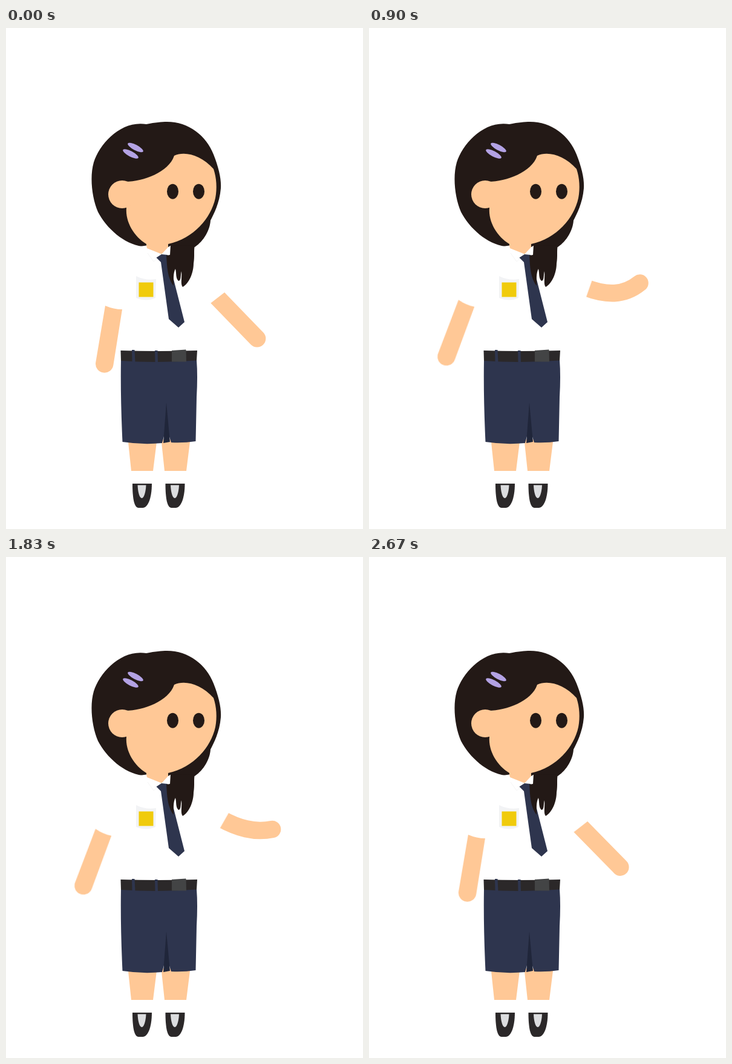
An HTML page without scripts for the animation above (2.7 s loop, 590 by 828 pixels).

```html
<!DOCTYPE html>
<html lang="en">
<head>
<meta charset="utf-8">
<title>Waving schoolgirl</title>
<style>
  html, body { margin: 0; width: 100%; height: 100%; overflow: hidden; background: #fff; }
  svg { display: block; width: 100vw; height: 100vh; }
  .skin { fill: #ffc896; }
  .hair { fill: #231916; }
  .navy { fill: #2e354e; }
  .black { fill: #2b2829; }
  .white { fill: #fff; }

  .swing, .sleeve, .wave, .eye, .lash { animation: 2700ms infinite ease-in-out; }
  .swing { transform-origin: 205px 373px; animation-name: swing; }
  .sleeve { transform-origin: 332px 415px; animation-name: sleeve; }
  .wave {
    fill: none; stroke: #ffc896; stroke-width: 28.6; stroke-linecap: round;
    animation-name: wave;
  }
  .eye { transform-box: fill-box; transform-origin: center; animation-name: blink; }
  .lash {
    fill: none; stroke: #231916; stroke-width: 1.5;
    animation-name: lash; animation-timing-function: step-end;
  }

  @keyframes swing {
    0%, 11.111%, 100% { transform: rotate(0deg); }
    33.333%, 77.778% { transform: rotate(11.3deg); }
  }

  /* The forearm starts late, then bends up twice. */
  @keyframes wave {
    0%, 11.111%, 100% { d: path("M346 442 C371 468 393 490.5 415 513.3"); }
    11.111% { animation-timing-function: ease-in; }
    21.111% {
      d: path("M351 437 C380 461 404 481 428.5 500.5");
      animation-timing-function: cubic-bezier(.35, .2, .58, 1);
    }
    33.333%, 77.778% { d: path("M358 429 C392 442 421 443 447.5 421.5"); }
    55.556% {
      d: path("M351 437 C379 459 402 478 426.5 487");
      animation-timing-function: ease-in;
    }
    67.778% {
      d: path("M355 432.5 C383 448 410 456 440 450.2");
      animation-timing-function: ease-out;
    }
    77.778% { animation-timing-function: ease-in; }
    87.778% {
      d: path("M352.5 435 C380 451 408 463 437.5 462.5");
      animation-timing-function: ease-out;
    }
  }
  @keyframes sleeve {
    0%, 11.111%, 100% { transform: rotate(0deg); }
    11.111% { animation-timing-function: ease-in; }
    21.111% {
      transform: rotate(-10.5deg);
      animation-timing-function: cubic-bezier(.35, .2, .58, 1);
    }
    33.333%, 77.778% { transform: rotate(-33deg); }
    55.556% { transform: rotate(-11deg); animation-timing-function: ease-in; }
    67.778% { transform: rotate(-22.5deg); animation-timing-function: ease-out; }
    77.778% { animation-timing-function: ease-in; }
    87.778% { transform: rotate(-17.5deg); animation-timing-function: ease-out; }
  }

  @keyframes blink {
    0%, 22.222%, 30%, 81.111%, 88.889%, 100% { transform: scale(1, 1); }
    22.222%, 28.889%, 81.111%, 87.778% { animation-timing-function: step-end; }
    23.333%, 28.889%, 82.222%, 87.778% { transform: scale(.8, .76); }
    26.111%, 85% { transform: scale(.8, .1); }
  }
  @keyframes lash {
    0%, 30%, 88.889%, 100% { opacity: 0; }
    23.333%, 82.222% { opacity: 1; }
  }
</style>
</head>
<body>
<svg viewBox="0 0 590 828" preserveAspectRatio="none">
  <defs>
    <g id="shoe">
      <path class="black" d="M209 753H241C241 778 234 793 226 793H219C212 793 209 778 209 753Z"/>
      <path fill="#dcdddf" d="M217.500 755.500H231.500C231 767 228 777 224.500 777C220.500 777 218 767 217.500 755.500Z"/>
    </g>
    <path id="leg" class="skin" d="M201.500 680H249.500L243 732H207Z"/>
    <ellipse id="clip" rx="14.300" ry="4.600" fill="#b3a2e4"/>
  </defs>

  <!-- arms -->
  <path class="skin swing" d="M164 459Q178 465 192 465L177.400 557A14.600 14.600 0 0 1 148.200 553Z"/>
  <path class="wave" d="M346 442 C371 468 393 490.500 415 513.300"/>
  <path class="white sleeve" d="M365 434L334 458L316 434L347 410Z"/>

  <!-- legs, shorts and belt -->
  <use href="#leg"/>
  <use href="#leg" x="55"/>
  <use href="#shoe"/>
  <use href="#shoe" x="54.500"/>
  <path class="navy" d="M190 549H315Q317 575 315 610L313.500 683Q294 686 273 685L265 660L258 686Q225 689 192.500 684Q189 610 190 549Z"/>
  <path fill="#20263a" d="M265 619L271 684L260 686Z"/>
  <path class="black" d="M189.500 533Q250 535 316 533L315 549.500Q250 554 190 550Z"/>
  <path class="navy" d="M208 532H212.500L213.500 552H208.500ZM246 533H250.500L251 552.500H246.500Z"/>
  <path fill="#434445" d="M274 533L297.500 531.500L298 551.500H274Z"/>

  <!-- head -->
  <path class="hair" d="M232 159C247 156 257 155 266 155C302 155 331 178 343 209C352 232 356 250 355 265
    C353 290 343 308 338 318C337 334 327 352 312 362L266 362L225 361C195 357 166 331 152 304
    C142 281 138 246 145 222C155 190 191 152 232 159Z"/>
  <path class="skin" d="M187 253C214 258 268 242 278 211C296 203 322 210 343 233C348 248 349 265 346 281
    C339 314 310 348 268 357V366L257 376L232 366V357C212 345 197 321 199 297Z"/>
  <circle class="skin" cx="192" cy="275" r="23"/>
  <path class="white" d="M268 362L272.500 359.500L272 375L257 374ZM221 361L232 359.500L233 364L258 374L249 381L243 386Z"/>
  <path fill="none" stroke="#f5f5f5" d="M234 372L244 386L250 381"/>
  <ellipse class="hair eye" cx="275.500" cy="270.200" rx="9.500" ry="12.500"/>
  <ellipse class="hair eye" cx="318.500" cy="270.200" rx="9.500" ry="12.500"/>
  <path class="lash" d="M271 260Q275.500 257.500 280 260M314 260Q318.500 257.500 323 260"/>
  <use href="#clip" transform="translate(214 197.500) rotate(28)"/>
  <use href="#clip" transform="translate(206 208) rotate(28)"/>

  <!-- tie, ponytail and badge -->
  <path class="navy" d="M248.500 379.500L257 374L267 375L270 388L295 486L285 495L269 481L256 387Z"/>
  <path class="hair" d="M272 359L312 360C310 367 312 377 310 389C310 404 303 422 292 428C288 423 291 414 290 402
    C288 408 290 418 285 418C280 413 282 406 280 398C276 405 277 416 277 426C270 418 267 404 266 391L265 376L271 375Z"/>
  <path fill="#f2f3f5" d="M215 410Q231 418 248 415L247 446Q232 453 215 446Z"/>
  <rect x="219.500" y="420.500" width="24" height="24" fill="#f0cb0c"/>
</svg>
</body>
</html>
```
